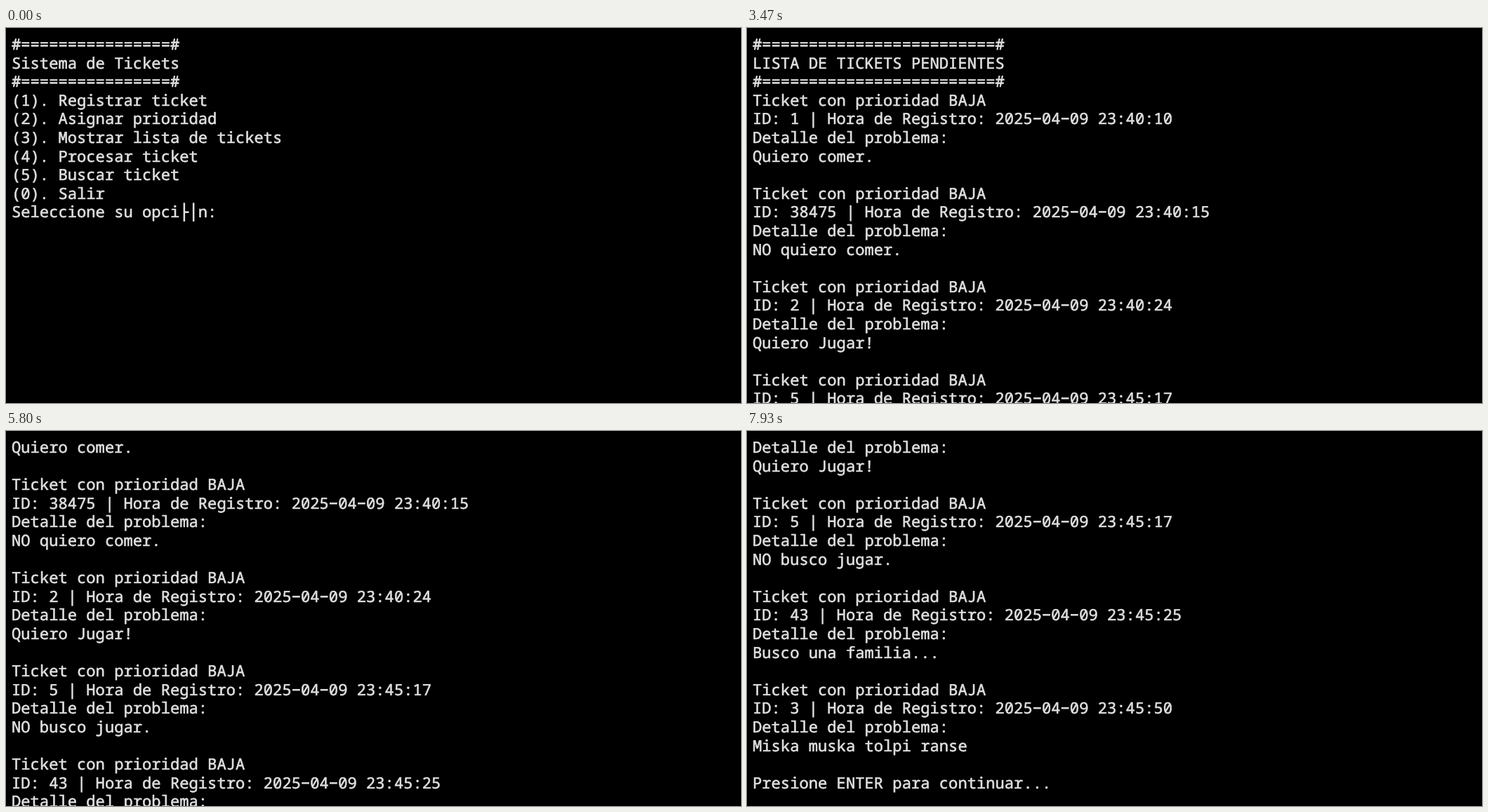
Write an HTML page with a canvas that moves like this. It is 1047x535 px and loops after 8000 ms.

```html
<!DOCTYPE html>
<html lang="es">
<head>
<meta charset="utf-8">
<title>Sistema de Tickets</title>
<style>
  html, body { margin: 0; width: 100%; height: 100%; overflow: hidden; background: #000; }
  canvas { display: block; }
</style>
</head>
<body>
<canvas id="stage" width="1047" height="535"></canvas>
<script>
const ctx = document.getElementById('stage').getContext('2d');

const LOOP = 8000;
const LEFT = 8, TOP = 10;
const CELL = 13.29, LINE = 26.6, BASELINE = 21;
const ROWS = 20;
const INK = '#e0e0e0';
const BOX_STROKE = 2.5;

const rule = n => '#' + '='.repeat(n) + '#';

const menu = [
  rule(16),
  'Sistema de Tickets',
  rule(16),
  '(1). Registrar ticket',
  '(2). Asignar prioridad',
  '(3). Mostrar lista de tickets',
  '(4). Procesar ticket',
  '(5). Buscar ticket',
  '(0). Salir',
  'Seleccione su opci├│n:',
];

const ticket = (id, time, detail) => [
  'Ticket con prioridad BAJA',
  `ID: ${id} | Hora de Registro: 2025−04−09 ${time}`,
  'Detalle del problema:',
  detail,
  '',
];

const list = [
  rule(25),
  'LISTA DE TICKETS PENDIENTES',
  rule(25),
  ...ticket(1, '23:40:10', 'Quiero comer.'),
  ...ticket(38475, '23:40:15', 'NO quiero comer.'),
  ...ticket(2, '23:40:24', 'Quiero Jugar!'),
  ...ticket(5, '23:45:17', 'NO busco jugar.'),
  ...ticket(43, '23:45:25', 'Busco una familia...'),
  ...ticket(3, '23:45:50', 'Miska muska tolpi ranse'),
  'Presione ENTER para continuar...',
  '',
];

const TYPED_AT = 1330, LIST_AT = 1800;

// [time, first visible line]
const scroll = [
  [1800, 15], [3330, 10], [3400, 5], [3470, 0], [4530, 1],
  [4870, 2], [4930, 3], [5070, 4], [5470, 5],
  [5800, 6], [5930, 7], [6070, 8], [6130, 9], [6330, 10],
  [6670, 11], [6800, 12], [7330, 13], [7530, 14], [7730, 15],
];

// [time, cursor shown]
const blink = [
  [0, false], [70, true], [600, false], [1200, true],
  [2400, false], [2930, true], [7930, false],
];

const valueAt = (steps, t) => steps.filter(([at]) => at <= t).pop()[1];
const rowTop = row => TOP + row * LINE;

// Box-drawing characters fill their whole cell
function drawBox(ch, x, y) {
  const mid = x + CELL / 2;
  ctx.fillRect(mid - BOX_STROKE / 2, y, BOX_STROKE, LINE);
  if (ch === '├') ctx.fillRect(mid, y + (LINE - BOX_STROKE) / 2, CELL / 2, BOX_STROKE);
}

// A thin outline gives the text its medium weight
function drawGlyph(ch, x, y) {
  ctx.fillText(ch, x, y);
  ctx.strokeText(ch, x, y);
}

function drawLine(text, row) {
  const y = rowTop(row);
  [...text].forEach((ch, col) => {
    const x = LEFT + col * CELL;
    if (ch === '├' || ch === '│') drawBox(ch, x, y);
    else if (ch !== ' ') drawGlyph(ch, x, Math.round(y + BASELINE));
  });
}

function drawCursor(row, col) {
  ctx.fillRect(Math.floor(LEFT + col * CELL), Math.round(rowTop(row)), 1, 27);
}

function draw(t) {
  ctx.fillStyle = '#000';
  ctx.fillRect(0, 0, 1047, 535);
  ctx.fillStyle = ctx.strokeStyle = INK;
  ctx.lineWidth = 0.6;
  ctx.lineJoin = 'round';
  ctx.font = '22.15px "Noto Sans Mono", "DejaVu Sans Mono", monospace';
  ctx.textRendering = 'geometricPrecision';

  const shown = valueAt(blink, t);
  if (t < LIST_AT) {
    const input = t < TYPED_AT ? '' : '3';
    [...menu, input].forEach(drawLine);
    if (shown) drawCursor(menu.length, input.length);
    return;
  }
  const first = valueAt(scroll, t);
  list.slice(first, first + ROWS).forEach(drawLine);
  const cursorRow = list.length - 1 - first;
  if (shown && cursorRow < ROWS) drawCursor(cursorRow, 0);
}

const start = performance.now();
function tick() {
  draw((performance.now() - start) % LOOP);
  requestAnimationFrame(tick);
}
tick();
</script>
</body>
</html>
```
